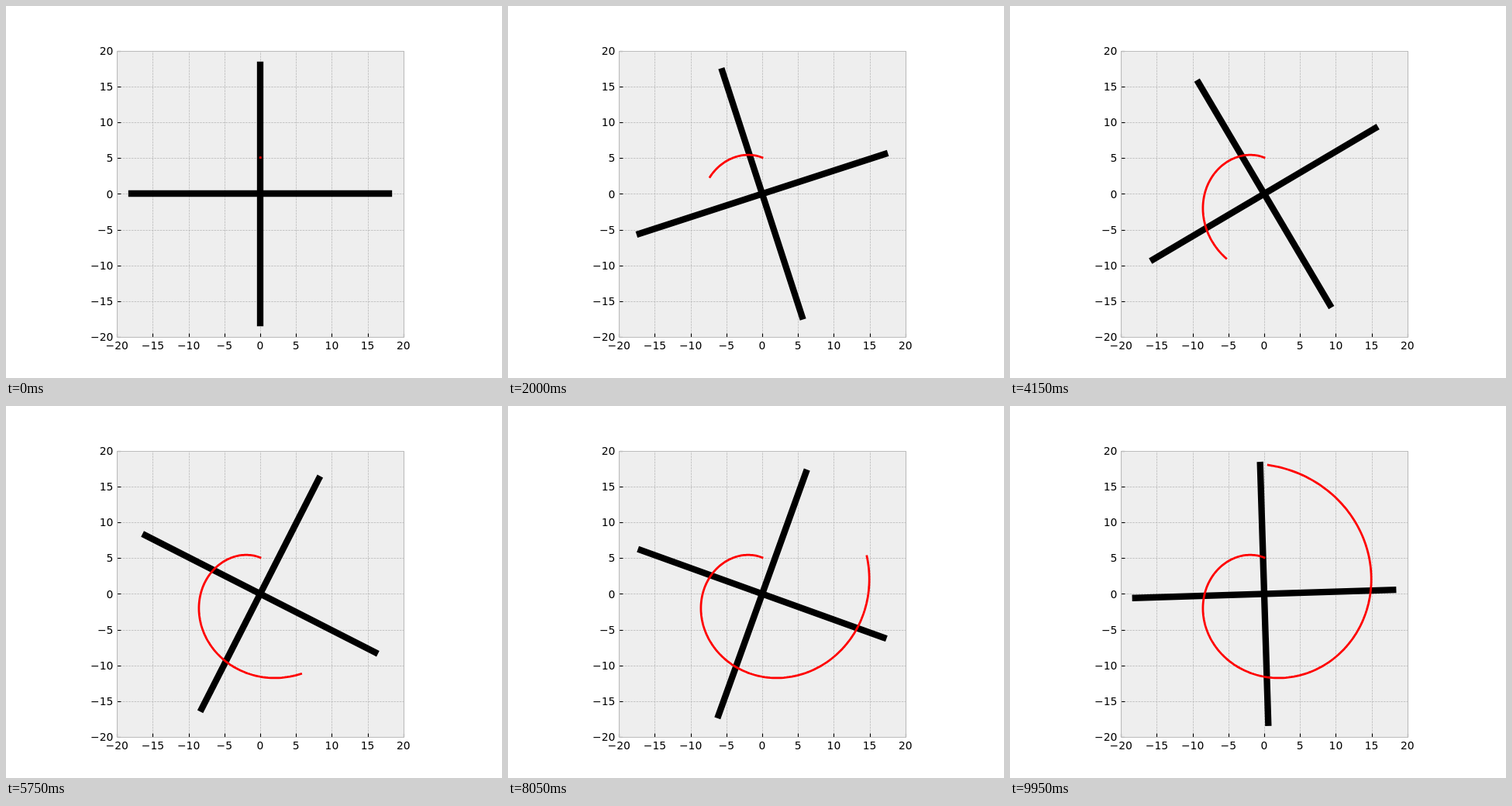
An HTML page with a canvas for the animation above (10 s loop, 640 by 480 pixels).

```html
<!DOCTYPE html>
<html lang="en">
<head>
<meta charset="utf-8">
<title>Rotating cross and spiral</title>
<style>
  html, body { margin: 0; width: 100%; height: 100%; overflow: hidden; background: #fff; }
  canvas { display: block; }
</style>
</head>
<body>
<canvas id="stage" width="640" height="480"></canvas>
<script>
const ctx = document.getElementById("stage").getContext("2d");

const STEPS = 200, STEP_MS = 50;
const LEFT = 143.2, RIGHT = 512.8, TOP = 57.6, BOTTOM = 427.2;
const UNIT = (RIGHT - LEFT) / 40;
const CX = (LEFT + RIGHT) / 2, CY = (TOP + BOTTOM) / 2;
const ROD = 18, R_START = 5, R_END = 18;

const toX = x => CX + x * UNIT;
const toY = y => CY - y * UNIT;
const snap = v => Math.round(v) + 0.5;
const angleAt = step => step / STEPS * 2 * Math.PI;

function line(x1, y1, x2, y2) {
  ctx.beginPath();
  ctx.moveTo(x1, y1);
  ctx.lineTo(x2, y2);
  ctx.stroke();
}

function stroke(color, width, cap = "butt", dash = []) {
  ctx.strokeStyle = color;
  ctx.lineWidth = width;
  ctx.lineCap = cap;
  ctx.setLineDash(dash);
}

function drawAxes() {
  const l = snap(LEFT), r = snap(RIGHT), t = snap(TOP), b = snap(BOTTOM);
  ctx.fillStyle = "#fff";
  ctx.fillRect(0, 0, 640, 480);
  ctx.fillStyle = "#eee";
  ctx.fillRect(l, t, r - l, b - t);

  ctx.font = '13.89px "DejaVu Sans", sans-serif';
  ctx.textBaseline = "alphabetic";
  for (let v = -20; v <= 20; v += 5) {
    const x = snap(toX(v)), y = snap(toY(v));
    const label = String(v).replace("-", "\u2212");

    stroke("#b2b2b2", 0.69, "butt", [2.57, 1.11]);
    line(x, b, x, t);
    line(l, y, r, y);

    stroke("#000", 1.11);
    line(x, b, x, b - 4.86);
    line(l, y, l + 4.86, y);

    ctx.fillStyle = "#000";
    ctx.textAlign = "center";
    ctx.fillText(label, toX(v), 443);
    ctx.textAlign = "right";
    ctx.fillText(label, LEFT - 4.86, Math.round(toY(v) + 5.2));
  }

  stroke("#bcbcbc", 1.11);
  ctx.strokeRect(l, t, r - l, b - t);
}

function drawCross(step) {
  const upright = step % (STEPS / 4) === 0;
  const px = v => upright ? Math.round(v) : v;
  stroke("#000", 8.33, "square");
  for (const turn of [0, Math.PI / 2]) {
    const a = angleAt(step) + turn;
    const x = ROD * Math.sin(a), y = ROD * Math.cos(a);
    line(px(toX(-x)), px(toY(-y)), px(toX(x)), px(toY(y)));
  }
}

function spiralPoint(step) {
  const r = R_START + (R_END - R_START) * (step + 1) / STEPS;
  const a = angleAt(step);
  return [toX(-r * Math.sin(a)), toY(r * Math.cos(a))];
}

function drawSpiral(step) {
  if (step === 0) {
    const [x, y] = spiralPoint(0);
    ctx.fillStyle = "#f00";
    ctx.fillRect(x - 1.1, y - 1.4, 2.78, 2.78);
    return;
  }
  stroke("#f00", 2.78, "square");
  ctx.lineJoin = "round";
  ctx.beginPath();
  for (let i = 0; i <= step; i++) ctx.lineTo(...spiralPoint(i));
  ctx.stroke();
}

function render(time) {
  const step = Math.floor(time / STEP_MS) % STEPS;
  drawAxes();
  drawCross(step);
  drawSpiral(step);
}

const start = performance.now();
function tick() {
  render(performance.now() - start);
  requestAnimationFrame(tick);
}
tick();
</script>
</body>
</html>
```
